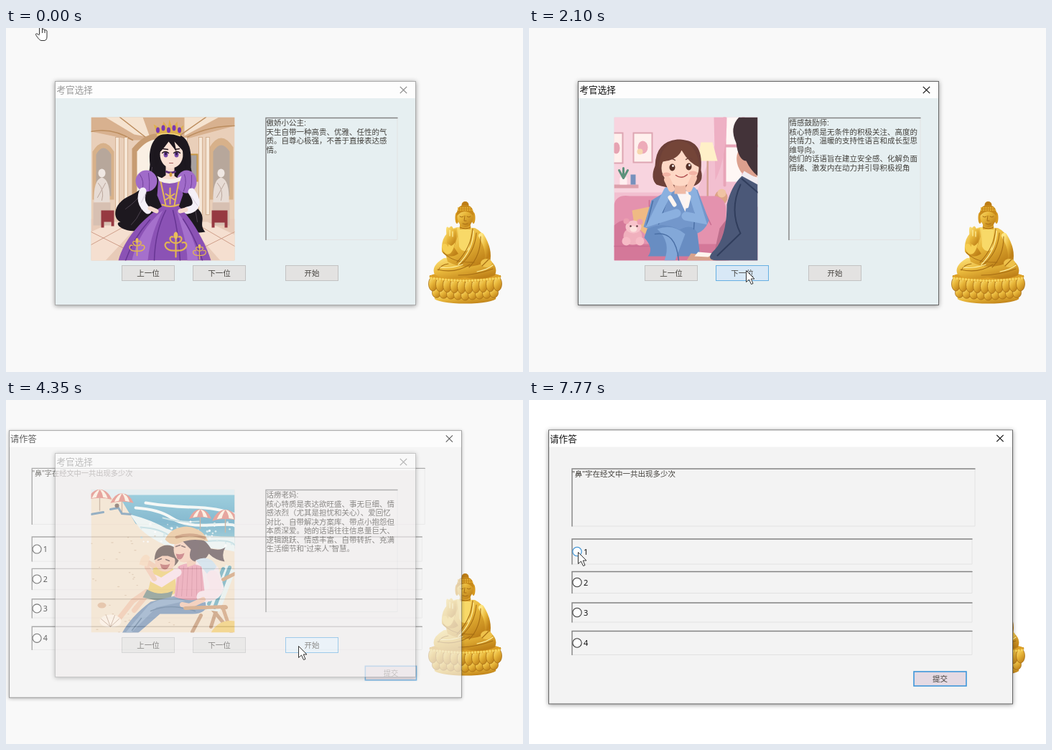
These frames come from a looping animation (720 px wide and 480 px high, 8 s). An HTML page:

```html
<!DOCTYPE html>
<html lang="zh-CN">
<head>
<meta charset="utf-8">
<style>
html, body { margin: 0; width: 100%; height: 100%; overflow: hidden; background: #f9f9f9 }
svg { display: block }
text { font: 10.5px "Liberation Sans", "Noto Sans CJK SC", "Noto Sans CJK", sans-serif; fill: #43403c }
.title { font-size: 12.6px; fill: #111 }
.label { text-anchor: middle }
.digit { font: 11px "Noto Sans", sans-serif; fill: #111 }
.frame { stroke: #666; filter: drop-shadow(0 1px 3px #0006) }
.close { stroke: #111; stroke-width: 1.2 }
.inactive .title { fill: #999 }
.inactive .close { stroke: #888 }
.inactive .frame { stroke: #aaa }
</style>
</head>
<body>
<svg id="stage" width="100%" height="100%" viewBox="0 0 720 480"></svg>
<script>
const LOOP = 8000, STEP = 161;
const fill = (color, d) => `<path fill="${color}" d="${d}"/>`;
const line = (color, width, d) =>
  `<path fill="none" stroke="${color}" stroke-width="${width}" stroke-linecap="round" d="${d}"/>`;
const oval = (color, x, y, rx, ry = rx, more = '') =>
  `<ellipse fill="${color}" cx="${x}" cy="${y}" rx="${rx}" ry="${ry}" ${more}/>`;
const box = (color, x, y, w, h, more = '') =>
  `<rect fill="${color}" x="${x}" y="${y}" width="${w}" height="${h}" ${more}/>`;
const text = (x, y, s, cls = '') => `<text x="${x}" y="${y}" class="${cls}">${s}</text>`;
const repeat = (n, f) => Array.from({ length: n }, (_, i) => f(i)).join('');
const gradient = (id, stops, dir = 'x2="0" y2="1"') => `<linearGradient id="${id}" ${dir}>` +
  stops.map((c, i) => `<stop offset="${i / (stops.length - 1)}" stop-color="${c}"/>`).join('') + '</linearGradient>';
const noise = n => { const v = Math.sin(n * 127.1) * 43758.5; return v - Math.floor(v); };

const statue = x => oval('#efe7e2', x, 78, 5, 6) + fill('#e7dcd5', `M${x - 11} 119Q${x - 12} 87 ${x} 84Q${x + 12} 87 ${x + 11} 119Z`) +
  line('#bba79d', 1, `M${x - 5} 92Q${x + 4} 102 ${x} 116M${x + 5} 92L${x - 6} 112`) + box('#d7c0b2', x - 12, 119, 24, 32);

const scroll = (x, y, s) => `<g transform="translate(${x} ${y}) scale(${s})">` +
  line('#e2b552', 2.2, 'M0 17V-13M0 8C-18 10 -18 -6 -9 -3M0 8C18 10 18 -6 9 -3M0 -2C-11 -4 -9 -13 -4 -11M0 -2C11 -4 9 -13 4 -11') +
  oval('#e8bd5c', 0, -13, 3, 5) + '</g>';

const princess = box('#e9cfb9', 0, 0, 200, 200) +
  fill('#d8b18f', 'M0 0H200V12L126 32H58L0 20Z') + fill('#f5e3d0', 'M20 0H72L82 28L60 24ZM130 0H178L130 26Z') +
  line('#bc8d5e', 1.5, 'M0 20Q30 14 58 32M200 12Q160 12 126 32M40 0L76 28M160 0L120 28') +
  fill('#c79c72', 'M57 116V44Q91 2 127 44V116Z') + fill('#faf0e4', 'M64 116V48Q91 14 120 48V116Z') +
  fill('#d7b18a', 'M2 115V48Q17 24 32 48V115ZM165 115V42Q181 16 198 42V115Z') +
  fill('#b7a79b', 'M7 110V52Q17 34 28 52V110ZM170 110V48Q181 30 193 48V110Z') +
  repeat(5, i => box('#f6e7d7', [34, 46, 129, 150, 160][i], 28, 5, 108, 'stroke="#caa27e" stroke-width=".7"')) +
  box('#a8a1a0', 136, 52, 12, 37, 'stroke="#c79745" stroke-width="2"') +
  box('#e8cbb8', 0, 142, 200, 58) + fill('#f5dfd0', 'M0 160L30 146H70L20 200H0ZM200 164L162 146H132L180 200H200Z') +
  line('#cf9f8a', 1, 'M0 178L60 145M0 160L80 200M200 180L140 145M200 160L120 200') +
  statue(15) + statue(181) +
  fill('#963941', 'M14 130H32V152H28V146H18V154H14ZM168 130H190V154H186V147H172V154H168Z') +
  fill('#1d181f', 'M108 22C82 23 80 51 82 66C80 91 73 101 53 110C31 120 29 141 41 146C29 148 47 162 66 158C100 164 136 163 159 160C148 147 163 142 148 127C139 103 143 87 139 70C141 34 131 22 108 22Z') +
  line('#4b414e', 1, 'M85 70Q82 104 48 128M78 101Q72 135 56 150M136 78Q141 104 148 146') +
  fill('#f6dace', 'M104 66H116V82L125 88H94L104 81Z') +
  fill('#8f58b6', 'M94 84Q109 91 124 84L128 108L120 131H101L92 109Z') +
  fill('#8b52b5', 'M101 123Q110 128 121 123C139 140 159 173 167 200H38C48 164 78 137 101 123Z') +
  fill('#a570cc', 'M100 130C78 147 62 175 57 200H79C82 169 91 147 100 130ZM119 130C127 157 134 177 134 200H149C146 172 132 147 119 130Z') +
  line('#673593', 1.5, 'M104 130Q89 160 88 200M114 130Q122 162 124 200M128 142Q146 169 155 200M82 143Q58 170 48 200') +
  scroll(64, 181, .7) + scroll(118, 178, 1) + scroll(151, 188, .6) +
  oval('#a06bc9', 77, 89, 15, 15) + oval('#a06bc9', 133, 90, 14, 16) +
  line('#71409a', 1, 'M68 80Q75 90 71 101M80 78Q82 90 81 103M130 80Q134 90 129 103M140 81Q141 92 138 103') +
  line('#f4eff7', 10, 'M72 103Q66 119 79 130M140 104Q155 126 134 130') + line('#d6cad9', 1, 'M76 106L70 119M139 110L148 123') +
  line('#f6dacd', 6, 'M82 127L91 131M132 129L124 131') +
  line('#e5b858', 2, 'M96 85L104 123M123 85L116 123M99 122Q110 127 122 122M110 99V121M104 107L116 115M116 107L104 115') +
  fill('#f6efea', 'M92 82Q109 91 126 82L124 89Q109 96 95 89Z') +
  line('#5c307b', 3, 'M105 76Q111 79 117 76') + oval('#d39b3c', 111, 80, 2, 3) +
  oval('#fae1d5', 112, 52, 16, 19) + fill('#1c171e', 'M91 70C83 47 89 24 111 24C132 25 133 52 132 74Q128 61 128 47L116 34L119 48L108 34Q97 49 95 49Q97 59 91 70Z') +
  oval('#7749a8', 104, 52, 3, 4) + oval('#7749a8', 119, 52, 3, 4) + oval('#2b173c', 104, 51, 1.3, 2) + oval('#2b173c', 119, 51, 1.3, 2) +
  line('#271920', 1.4, 'M99 50Q103 46 108 50M115 50Q120 46 124 50M100 44L107 45M117 45L123 44') + line('#a95e5d', 1, 'M109 64H114') +
  fill('#ddb04f', 'M92 25L87 10L98 16L101 6L107 15L109 3L113 15L120 6L121 17L129 11L124 26Q108 20 92 25Z') +
  repeat(5, i => oval('#7a38b0', 93 + i * 7.5, 18 - (i % 2) * 3, 2.5, 4)) + line('#f6d981', 1.5, 'M92 25Q108 20 124 26');

const counsellor = box('#f2bfd0', 0, 0, 200, 200) + fill('#f8d4df', 'M0 0H155L115 105H0Z') +
  box('#fff7f5', 155, 0, 45, 90) + line('#e8a5b8', 4, 'M154 0V95M180 0V80M154 40H200') + fill('#eeb0c4', 'M139 0H157Q157 55 141 88Z') +
  box('#fff1ee', 27, 22, 26, 41, 'stroke="#dda5b2" stroke-width="2"') + oval('#edabb9', 40, 42, 7, 9) + oval('#f7d7ae', 36, 48, 4) +
  box('#fff0ed', -4, 22, 16, 42, 'stroke="#dda5b2" stroke-width="2"') + oval('#e6a3b2', 3, 43, 5, 8) +
  box('#dda1ac', 0, 94, 34, 5) + box('#fff0f0', 8, 84, 10, 10) + line('#5c927c', 3, 'M13 85L7 74M13 85L13 71M13 85L19 74') + box('#7791bd', 23, 80, 7, 14) +
  box('#d5a292', 129, 56, 2.5, 70) + fill('#fff0c8', 'M121 35H137L144 61H116Z') + oval('#dda486', 149, 112, 9, 10) + oval('#f0c3a3', 150, 106, 6) +
  fill('#e492ae', 'M0 122Q3 107 22 110H142Q157 114 156 133V200H0Z') + fill('#d47899', 'M0 151Q15 137 28 150V177H160V200H0Z') +
  line('#c96e91', 1.5, 'M49 116V151M0 180H50M121 121L135 150') + fill('#efba84', 'M25 130L49 125L61 150L43 163L28 150Z') +
  oval('#f0b0bd', 26, 166, 13, 12) + oval('#f7c3cb', 27, 153, 11, 9) + oval('#ec9eb1', 17, 145, 4) + oval('#ec9eb1', 36, 146, 4) +
  oval('#fce2de', 27, 156, 5, 4) + oval('#563638', 23, 152, 1.2) + oval('#563638', 32, 152, 1.2) + oval('#f6bbc6', 17, 173, 6) + oval('#f6bbc6', 36, 173, 6) +
  fill('#7397cb', 'M52 116L77 101H116L132 144Q125 165 101 164L56 159L41 153Z') + fill('#faf4f4', 'M86 103H106L99 132Z') +
  fill('#688dc2', 'M46 156Q68 145 91 157Q110 147 116 162L120 194H47Q56 183 42 168Z') + fill('#83a8d8', 'M60 156Q81 148 99 163L85 200H70Q80 174 60 156Z') +
  line('#4b70a6', 1.5, 'M54 117L45 152M75 113L62 149M114 114L111 156M57 163Q86 158 90 200') +
  line('#8bb0df', 12, 'M75 103L55 144L87 134M109 103L121 142L100 138') +
  fill('#6d4038', 'M88 31Q58 34 57 68Q50 85 59 94Q81 102 111 96Q126 91 121 74C124 41 112 31 88 31Z') +
  box('#efbba7', 84, 86, 16, 21) + oval('#fed8c5', 92, 71, 26, 25) +
  fill('#744538', 'M62 72Q64 34 91 33Q115 35 119 70Q104 64 94 46Q89 59 68 62Z') +
  oval('#ec9d91', 73, 80, 6, 3, 'opacity=".6"') + oval('#ec9d91', 110, 78, 6, 3, 'opacity=".6"') +
  oval('#563027', 81, 70, 4, 5) + oval('#563027', 104, 69, 4, 5) + oval('#fff', 82, 68, 1.4) + oval('#fff', 105, 67, 1.4) +
  line('#70433a', 1.3, 'M75 60Q80 56 85 60M100 59Q105 55 109 59') + line('#b15354', 1.5, 'M86 81Q94 87 102 80') +
  line('#f9c8b4', 9, 'M74 87L80 100M111 85L104 100') + line('#fff5ef', 6, 'M78 112L84 122M104 111L101 124') +
  fill('#bd6e8c', 'M147 155Q171 120 200 125V200H137Z') + fill('#d8a38c', 'M107 190L151 194V200H101Z') + fill('#fff4ee', 'M117 188L139 190L131 195L112 194Z') +
  fill('#dca08e', 'M174 45Q166 60 177 77L199 84V45Z') + fill('#433339', 'M170 36Q160 14 174 0H200V82Q190 74 184 61Q173 60 170 36Z') +
  fill('#f0ecf1', 'M181 75L200 86V96L176 85Z') + fill('#4b5878', 'M178 82L200 94V200H143Q125 199 141 184Q157 165 157 122Q163 96 178 82Z') +
  line('#303d5c', 2, 'M176 94Q160 130 176 162L144 193M178 86L200 105');

const parasol = (x, y, s) => `<g transform="translate(${x} ${y}) scale(${s})">` + line('#b29073', 2, 'M0 -8V30') +
  fill('#df7367', 'M-26 7Q-16 -15 0 -15Q18 -14 26 7Q0 0 -26 7Z') + fill('#fff0db', 'M-17 4Q-10 -12 0 -15Q-6 -4 -7 2ZM7 2Q6 -8 0 -15Q12 -13 17 4Z') + '</g>';

const beach = box('#f4dec3', 0, 0, 200, 200) + box('#dcebef', 0, 0, 200, 12) +
  fill('url(#sea)', 'M38 8H200V83Q146 66 105 73L62 48Z') + fill('#eaf4f2', 'M54 35Q85 43 105 55Q135 66 200 66V87Q161 78 126 86Q92 77 68 55Z') +
  line('#f5fbf8', 4, 'M62 26Q94 28 112 40T165 50T200 51M76 19Q105 24 141 25T200 35') +
  line('#add4dc', 2, 'M69 53Q98 55 110 66T158 73T200 78M100 40Q126 47 150 45') +
  repeat(45, i => oval(i % 2 ? '#fff' : '#c7e4e7', 70 + noise(i) * 128, 45 + noise(i + 70) * 34, .7 + noise(i + 9) * 1.2)) +
  repeat(55, i => oval('#c49d76', noise(i + 4) * 120, 65 + noise(i + 33) * 135, 1 + noise(i), .7, 'opacity=".6"')) +
  parasol(12, 10, .65) + parasol(43, 15, .62) + parasol(152, 37, .6) + parasol(187, 39, .7) +
  line('#5682a2', 3, 'M27 28L38 26L43 34L55 35M0 35L17 32') + oval('#62483c', 36, 23, 3) +
  line('#bb8153', 5, 'M193 110L167 192M129 167L188 165M167 165L192 196M153 176L141 199') +
  fill('#e6f1ee', 'M188 105L201 114L179 171L152 167Z') + line('#4c9aae', 5, 'M193 109L172 165M184 111L164 160') +
  line('#f1bb98', 7, 'M77 143L58 156L40 179M82 142L60 169M92 110L79 102') +
  fill('#eec557', 'M87 110Q103 102 116 113L119 144Q98 157 79 143Z') + fill('#637a70', 'M78 140Q96 150 114 142L109 159L72 151Z') +
  oval('#4c332c', 106, 94, 17, 16) + oval('#f4bea0', 103, 101, 14, 14) + fill('#49312b', 'M88 99Q90 80 107 82Q120 84 121 98L107 93L99 93Z') +
  line('#543430', 1.5, 'M93 99L98 97M104 98L109 100') + fill('#b44e49', 'M96 104Q104 107 110 104Q106 116 98 110Z') +
  fill('#493335', 'M133 66Q154 62 167 83Q181 86 187 81Q181 91 186 101Q173 99 164 90Q157 104 143 98Z') +
  fill('#5e7ea6', 'M121 148Q148 143 159 157Q164 173 142 174L96 174L65 201H43Q55 178 83 157Z') +
  fill('#7c9bbd', 'M80 162Q106 145 131 156L91 165L56 200H48Z') + line('#3e6087', 1.5, 'M83 170Q109 158 145 170M70 180L57 197') +
  fill('#f6e5e8', 'M145 100Q166 96 177 109L185 137Q182 155 161 157L149 145L119 146L121 111Z') +
  fill('#eb8ca1', 'M121 108Q135 99 154 108L159 151Q139 159 116 150Z') + repeat(6, i => line('#c9677f', .8, `M${123 + i * 6} 108L${119 + i * 7} 149`)) +
  fill('#c5dcea', 'M146 99Q165 90 175 108L164 121Z') + line('#f9dfe5', 16, 'M169 121Q182 147 155 150') + line('#f4bb9e', 7, 'M156 154L137 163L127 161') +
  line('#fadbe3', 12, 'M120 116L98 130L88 125') + line('#f4bd9f', 7, 'M88 125L78 109') +
  fill('#f7cfaa', 'M69 98Q75 86 82 95L78 108L67 105Z') + fill('#f4bd9f', 'M132 89H146V104L134 109Z') +
  oval('#f7c5a9', 130, 84, 15, 18) + fill('#493236', 'M124 69L151 68Q151 92 145 101Q134 99 139 84Z') +
  fill('#b84f54', 'M118 90Q125 92 130 89Q127 101 120 97Z') + line('#603d38', 1.5, 'M118 80L124 78M126 79L131 81') +
  fill('#e9b982', 'M103 70Q111 53 133 52Q157 55 163 73Q139 67 121 76Q110 79 103 70Z') + line('#bd7b4c', 4, 'M119 67Q138 60 158 68') +
  line('#c98c59', 5, 'M131 166L187 164M184 126L200 118M183 164L195 199') + fill('#f3c453', 'M167 200Q178 181 200 184V200Z') +
  oval('#fff0de', 27, 184, 15, 9) + line('#bd9981', 1, 'M27 192L14 181M27 192L21 176M27 192L33 176M27 192L39 181') + oval('#dda97f', 15, 162, 6, 4);

const gold = 'url(#gold)', deep = '#a66d13';
const petals = (y, n, gap, rx, ry) => repeat(n, i => {
  const k = i - (n - 1) / 2;
  return oval(gold, 639.5 + k * gap, y - Math.abs(k) * .9, rx, ry, `stroke="${deep}" stroke-width=".8"`);
});
const buddha = fill(deep, 'M590 345H689L684 374Q639 394 595 373Z') +
  oval(gold, 639.5, 377, 43, 7.5) + petals(373, 9, 10, 6, 7) + petals(361, 10, 10, 6, 10) + oval('#dca027', 639.5, 347, 50, 7) +
  repeat(24, i => oval('#f7d55d', 592 + i * 4.1, 349 + 3.5 * Math.sin(i / 23 * Math.PI), 1.8)) +
  fill(gold, 'M610 321Q591 332 597 344Q615 353 639 348Q665 353 681 345Q687 330 667 320Z') +
  fill(gold, 'M628 278Q610 282 610 307L615 326Q641 340 670 326Q674 289 653 279Z') +
  fill('#f8d968', 'M630 279H648L645 309Q636 315 631 305Z') +
  fill(gold, 'M628 279Q605 285 607 312Q615 324 630 315L624 306L629 291Z') + line('#f6ce52', 8, 'M611 305Q616 320 621 301') +
  fill(gold, 'M614 300L613 282Q613 275 617 279Q621 273 623 281Q628 279 627 290Q627 301 620 304Z') +
  line(gold, 8, 'M662 290Q674 310 670 326') + oval('#eec14a', 669, 328, 8, 6) +
  line(deep, 1.1, 'M650 280Q648 306 628 327M655 286Q653 314 631 332M661 291Q661 318 645 334M609 313Q622 328 652 327M601 337Q626 343 646 330M630 345Q655 345 678 336M616 329Q606 330 602 338M663 332L672 323') +
  line('#fff0a0', 1.2, 'M651 283Q651 309 630 330M605 334Q619 336 636 330M656 340Q671 337 678 331M618 282V290M622 284V291') +
  box('#dca32d', 632, 270, 15, 11) + oval('#d7991f', 628, 265, 2.5, 8) + oval('#d7991f', 651, 265, 2.5, 8) +
  oval(gold, 639.5, 263, 11, 15) + oval('#bd7d15', 639.5, 247, 5, 5) + fill('#c88a1a', 'M628 262Q627 247 639 247Q652 247 651 262Q639 250 628 262Z') +
  repeat(13, i => oval('#e9b53a', 630 + i % 7 * 3.2, 254 - (i > 6) * 3, 1.1)) +
  line(deep, 1, 'M632 263Q635 265 637 263M642 263Q645 265 647 263M639 262L638 269H641M636 273Q640 275 643 273M632 278Q640 282 647 278');

const sunken = (x, y, w, h) => line('#e2e2e2', 1, `M${x + w} ${y}V${y + h}H${x}`) + line('#828282', 1.4, `M${x} ${y + h}V${y}H${x + w}`);
const cross = (x, y) => `<path class="close" d="M${x - 4.7} ${y - 4.7}l9.4 9.4m0 -9.4l-9.4 9.4"/>`;
const button = (id, x, label) => box('#e3e2e1', x, 331.5, 73, 21, `id="${id}" stroke="#c2c2c2"`) + text(x + 36.5, 346, label, 'label');
const examiners = [
  [princess, ['傲娇小公主:', '天生自带一种高贵、优雅、任性的气', '质。自尊心极强，不善于直接表达感', '情。']],
  [counsellor, ['情感鼓励师:', '核心特质是无条件的积极关注、高度的', '共情力、温暖的支持性语言和成长型思', '维导向。', '她们的话语旨在建立安全感、化解负面', '情绪、激发内在动力并引导积极视角']],
  [beach, ['话痨老妈:', '核心特质是表达欲旺盛、事无巨细、情', '感浓烈（尤其是担忧和关心）、爱回忆', '对比、自带解决方案库、带点小抱怨但', '本质深爱。她的话语往往信息量巨大、', '逻辑跳跃、情感丰富、自带转折、充满', '生活细节和“过来人”智慧。']],
];
const options = [[194, 35, 211.5], [239.5, 30, 254.5], [283, 27, 296.5], [322.5, 33, 339]];

stage.innerHTML = `<defs>${gradient('gold', ['#ffe783', '#e9b83b', '#bf8118'], 'x2=".7" y2="1"')}${gradient('sea', ['#63b5cf', '#3e93b7', '#82c5d0'])}</defs>` +
  box('#f9f9f9', 0, 0, 720, 480, 'id="desk"') + buddha +
  '<g id="quiz">' + box('#f3f3f3', 27.5, 42, 646, 382, 'class="frame"') + box('#fff', 28, 42.5, 645, 23, 'id="quizBar"') +
  text(29, 58.5, '请作答', 'title') + cross(656, 53.5) + sunken(60, 96, 561, 80) + text(60, 106.5, '"鼻"字在经文中一共出现多少次') +
  options.map(([y, h, mid], i) => sunken(60, y, 557, h) + oval('#fff', 67, mid, 6.2, 6.2, `id="radio${i}" stroke="#333" stroke-width="1.1"`) +
    text(76, mid + 4, i + 1, 'digit')).join('') +
  box('#e5dae3', 536, 379, 73, 20, 'stroke="#3f97da" stroke-width="1.6"') + text(572.5, 393, '提交', 'label') + '</g>' +
  '<g id="dialog">' + box('#e6eff1', 68.5, 74.5, 502, 312, 'class="frame" id="panel"') + box('#fdfdfd', 69, 75, 501, 23) +
  text(70.5, 91, '考官选择', 'title') + cross(553.5, 86.5) + sunken(362, 125.5, 183, 170) +
  button('prev', 161.5, '上一位') + button('next', 260.5, '下一位') + button('start', 389.5, '开始') +
  examiners.map(([art, lines], i) => `<g id="examiner${i}"><svg x="118.5" y="124.5" width="200" height="200" viewBox="0 0 200 200">${art}</svg>` +
    lines.map((s, row) => text(362.5, 136 + row * 12.5, s)).join('') + '</g>').join('') + '</g>' +
  '<path id="hand" fill="#fff" stroke="#333" d="M46.5 9V-4Q48.5 -7 50.5 -4V2Q53 0 54 3Q56 2 57 4V12Q57 17.5 53 17.5H49Q46 17 41.5 9.5Q41 6 46.5 10M50.5 2V7M54 3V7"/>' +
  '<path id="arrow" fill="#fff" stroke="#333" d="M.5 .5V16.5L4.5 13L7.5 19.5L10 18.5L7.2 12H12Z"/>';

const $ = id => document.getElementById(id);
const set = (id, attrs) => { for (const k in attrs) $(id).setAttribute(k, attrs[k]); };
const show = (id, on) => set(id, { display: on ? 'inline' : 'none' });

// Pointer moves: start time, number of steps, destination.
const moves = [[160, 7, 302, 338], [3090, 7, 407, 343], [4510, 5, 203, 56], [5350, 5, 234, 60],
  [6630, 4, 49, 190], [7280, 3, 67, 211], [7770, 1, 68, 212]];
function pointer(t) {
  let x = 49, y = 0;
  for (const [start, steps, toX, toY] of moves) {
    if (t < start) break;
    const s = Math.min(1, (Math.floor((t - start) / STEP) + 1) / steps), ease = s * s * (3 - 2 * s);
    x += (toX - x) * ease;
    y += (toY - y) * ease;
  }
  return [x, y];
}

function draw(t) {
  const [x, y] = pointer(t);
  const opening = t >= 4350 && t < 4510;
  show('hand', t < 160);
  show('arrow', t >= 160);
  set('arrow', { transform: `translate(${x} ${y})` });

  const dragging = t >= 5350 && t < 6630;
  set('desk', { fill: t < 5350 ? '#f9f9f9' : dragging ? '#f3f3f3' : '#fff' });
  set('quizBar', { fill: dragging ? '#f3f3f3' : '#fff' });

  const current = t < 1300 ? 0 : t < 2290 ? 1 : 2;
  examiners.forEach((_, i) => show('examiner' + i, i === current));
  set('panel', { fill: t < 1300 ? '#e6eff1' : t < 2100 ? '#f9ebf0' : t < 2290 ? '#e6eff1' : '#f1edee' });
  set('dialog', { class: t < 1140 || opening ? 'inactive' : '', opacity: opening ? .6 : 1 });
  show('dialog', t < 4510);
  for (const [id, left] of [['prev', 161], ['next', 260], ['start', 389]]) {
    const hover = x >= left && x < left + 74 && y >= 331 && y < 353;
    const pressed = t >= 1140 && t < 1300 || t >= 2100 && t < 2290 || t >= 4180 && t < 4350;
    set(id, { fill: !hover ? '#e3e2e1' : pressed ? '#d8e8f6' : '#e5f1fb', stroke: hover ? '#66afe3' : '#c2c2c2' });
  }

  show('quiz', t >= 4350);
  const [dx, dy] = t < 5350 ? [-31, -4] : t < 6630 ? [x - 234, y - 60] : [0, 0];
  set('quiz', {
    opacity: opening ? .65 : 1,
    transform: `translate(${dx} ${dy})` + (opening ? ' translate(350 233) scale(.975) translate(-350 -233)' : ''),
  });
  set('radio0', { stroke: t >= 7440 ? '#2b88d0' : '#333' });
}

function tick(now) {
  draw(now % LOOP);
  requestAnimationFrame(tick);
}
draw(0);
requestAnimationFrame(tick);
</script>
</body>
</html>
```
